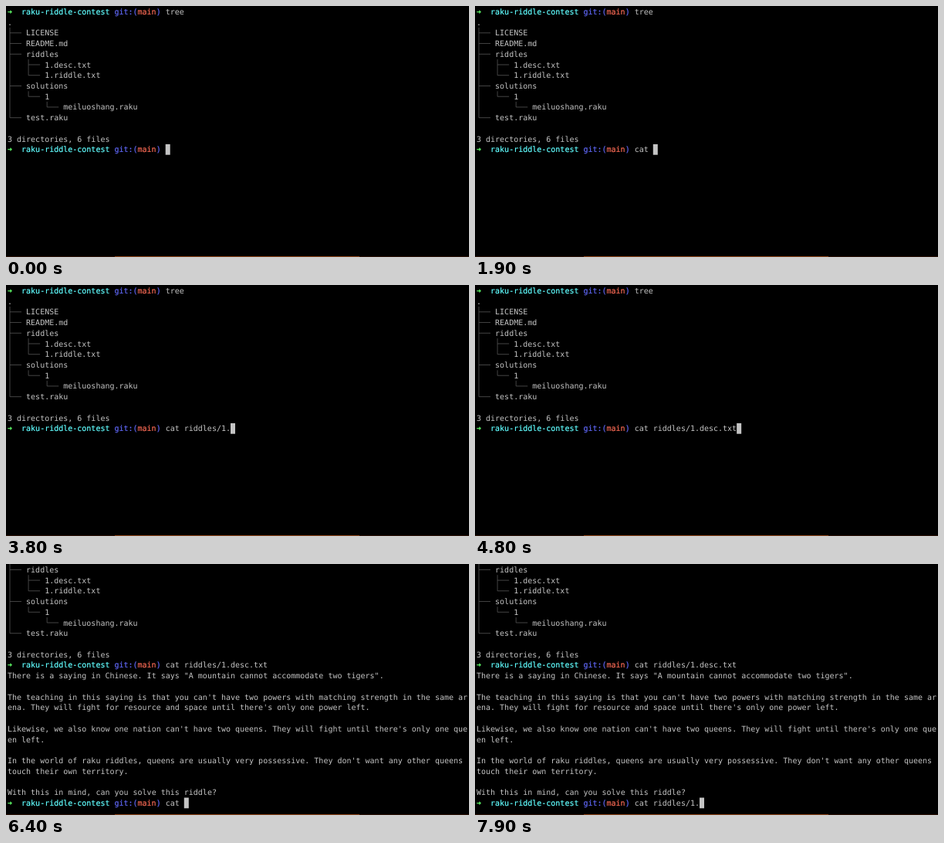
Write an HTML page that moves like this. It is 600x325 px and loops after 8000 ms.

```html
<!DOCTYPE html>
<html lang="en">
<head>
<meta charset="utf-8">
<title>Terminal</title>
<style>
html, body { margin: 0; width: 100%; height: 100%; overflow: hidden; background: #000; }
svg { display: block; }
text {
  font: 10px "DejaVu Sans Mono", "Liberation Mono", monospace;
  fill: #c4c4c4;
  white-space: pre;
  text-rendering: geometricPrecision;
}
.bright { fill: currentColor; stroke: currentColor; stroke-width: 0.2; }
.tree { fill: none; stroke: #565656; stroke-width: 0.8; }
</style>
</head>
<body>
<svg id="stage" width="600" height="325" viewBox="0 0 600 325">
  <rect width="600" height="325"/>
  <g id="screen"></g>
  <rect y="324" width="600" height="1" fill="#2c1206"/>
  <rect x="141" y="324" width="317" height="1" fill="#8c4418"/>
</svg>
<script>
const LOOP = 8000, ENTER = 4900;
const CELL = 6.0205, LEFT = 2, PITCH = 13.73, TOP = 0.5, BASE = 10.4;
const CMD_COL = 34, FIRST_ROW = 13, LAST_ROW = 26, SCROLL_ROWS = 4;

// [time, command on the active prompt]
const typing = [
  [0, ""], [400, "c"], [600, "ca"], [800, "cat"], [1000, "cat "],
  [2100, "cat r"], [2300, "cat ri"], [2500, "cat riddles/"],
  [2900, "cat riddles/1"], [3300, "cat riddles/1."],
  [3900, "cat riddles/1.d"], [4200, "cat riddles/1.desc.txt "],
  [4700, "cat riddles/1.desc.txt"],
  [ENTER, ""], [5800, "c"], [6000, "ca"], [6300, "cat"], [6400, "cat "],
  [6600, "cat r"], [6800, "cat ri"], [7000, "cat riddles/"],
  [7700, "cat riddles/1"], [7800, "cat riddles/1."]
];

const listing = [
  [1, 0, "."], [2, 4, "LICENSE"], [3, 4, "README.md"], [4, 4, "riddles"],
  [5, 8, "1.desc.txt"], [6, 8, "1.riddle.txt"], [7, 4, "solutions"],
  [8, 8, "1"], [9, 12, "meiluoshang.raku"], [10, 4, "test.raku"],
  [12, 0, "3 directories, 6 files"]
];

const output = [
  'There is a saying in Chinese. It says "A mountain cannot accommodate two tigers".',
  "",
  "The teaching in this saying is that you can't have two powers with matching strength in the same ar",
  "ena. They will fight for resource and space until there's only one power left.",
  "",
  "Likewise, we also know one nation can't have two queens. They will fight until there's only one que",
  "en left.",
  "",
  "In the world of raku riddles, queens are usually very possessive. They don't want any other queens ",
  "touch their own territory.",
  "",
  "With this in mind, can you solve this riddle?"
];

const screen = document.getElementById("screen");
const colX = col => LEFT + col * CELL;
const rowY = row => TOP + row * PITCH;

function add(parent, tag, attrs) {
  const el = document.createElementNS("http://www.w3.org/2000/svg", tag);
  for (const key in attrs) el.setAttribute(key, attrs[key]);
  parent.appendChild(el);
  return el;
}

function write(parent, row, col, str, color) {
  const x = colX(col), y = rowY(row) + BASE;
  // An invisible tilt keeps baselines from snapping to whole pixels.
  const el = add(parent, "text", { x, y, transform: `rotate(0.005 ${x} ${y})` });
  el.textContent = str;
  if (color) {
    el.setAttribute("class", "bright");
    el.style.color = color;
  }
  return el;
}

// Draws a prompt and returns its command text.
function prompt(parent, row, cmd) {
  write(parent, row, 0, "➜", "#5ffa68");
  write(parent, row, 3, "raku-riddle-contest", "#60fdff");
  write(parent, row, 23, "git:(", "#6068f8");
  write(parent, row, 28, "main", "#f96a55");
  write(parent, row, 32, ")", "#6068f8");
  return write(parent, row, CMD_COL, cmd);
}

// A trunk from the first row down to the last, with a branch at each row.
function branches(col, from, rows) {
  const x = colX(col + 0.5), mid = row => rowY(row + 0.5);
  let d = `M${x} ${rowY(from)}V${mid(rows[rows.length - 1])}`;
  for (const row of rows) d += `M${x} ${mid(row)}H${colX(col + 3)}`;
  add(screen, "path", { d, class: "tree" });
}

prompt(screen, 0, "tree");
listing.forEach(([row, col, str]) => write(screen, row, col, str));
branches(0, 2, [2, 3, 4, 7, 10]);
branches(4, 5, [5, 6]);
branches(4, 8, [8]);
branches(8, 9, [9]);

const firstCmd = prompt(screen, FIRST_ROW, "");
const after = add(screen, "g", {});
output.forEach((str, i) => write(after, FIRST_ROW + 1 + i, 0, str));
const lastCmd = prompt(after, LAST_ROW, "");
const cursor = add(screen, "rect", { width: CELL, height: PITCH, fill: "#c4c4c4" });

function draw(t) {
  const done = t >= ENTER;
  const cmd = typing.filter(step => step[0] <= t).pop()[1];
  firstCmd.textContent = done ? "cat riddles/1.desc.txt" : cmd;
  lastCmd.textContent = done ? cmd : "";
  after.setAttribute("visibility", done ? "visible" : "hidden");
  screen.setAttribute("transform", `translate(0 ${done ? -SCROLL_ROWS * PITCH : 0})`);
  cursor.setAttribute("x", colX(CMD_COL + cmd.length));
  cursor.setAttribute("y", rowY(done ? LAST_ROW : FIRST_ROW));
}

function tick() {
  draw(performance.now() % LOOP);
  requestAnimationFrame(tick);
}
tick();
</script>
</body>
</html>
```
